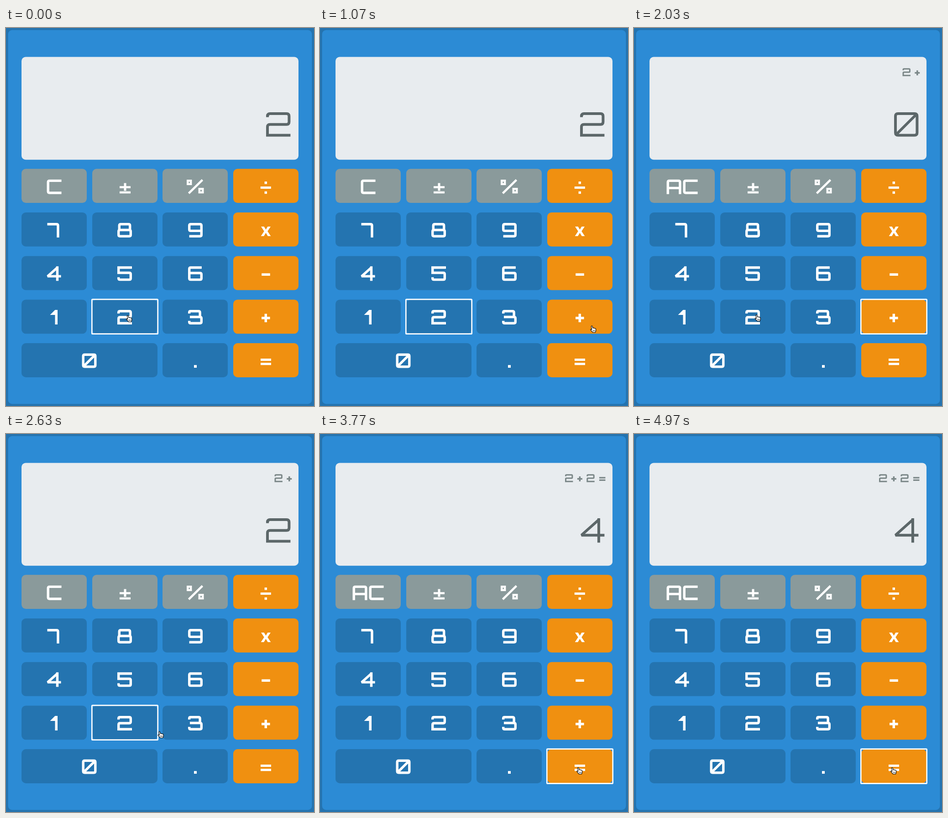
An HTML page that plays this animation: 675 by 830 pixels, repeating every 5.01 s.

```html
<!DOCTYPE html>
<html lang="en">
<head>
<meta charset="utf-8">
<title>Calculator</title>
<style>
  html, body { margin: 0; width: 100%; height: 100%; overflow: hidden; background: #2473af; }
  svg { display: block; width: 675px; height: 830px; }
  path { vector-effect: non-scaling-stroke; }
</style>
</head>
<body>
<svg id="stage" viewBox="0 0 675 830"></svg>
<script>
// Letter centrelines in a unit square; stroke width is added outside it.
const box = 'M.12 0H.88Q1 0 1 .12V.88Q1 1 .88 1H.12Q0 1 0 .88V.12Q0 0 .12 0Z';
const glyphs = {
  0: box + 'M.05 .95L.95 .05',
  2: 'M0 .1Q0 0 .12 0H.88Q1 0 1 .12V.38Q1 .5 .88 .5H.12Q0 .5 0 .62V1H1',
  3: 'M0 .1Q0 0 .1 0H.76Q.88 0 .88 .12V.48M.15 .48H.88Q1 .48 1 .6V.88Q1 1 .88 1H.12Q0 1 0 .9',
  4: 'M.8 1V0M.75 .05L0 .72H1',
  5: 'M1 0H0V.43H.88Q1 .43 1 .55V.88Q1 1 .88 1H.12Q0 1 0 .9',
  6: 'M.92 0H.12Q0 0 0 .12V.88Q0 1 .12 1H.88Q1 1 1 .88V.57Q1 .45 .88 .45H0',
  7: 'M0 0H.66Q.78 0 .78 .12V1',
  8: 'M.06 .48V.12Q.06 0 .18 0H.82Q.94 0 .94 .12V.48M.12 .48H.88Q1 .48 1 .6V.88Q1 1 .88 1H.12Q0 1 0 .88V.6Q0 .48 .12 .48Z',
  9: 'M1 .55H.12Q0 .55 0 .43V.12Q0 0 .12 0H.88Q1 0 1 .12V.88Q1 1 .88 1H.1',
  A: 'M0 1V.12Q0 0 .12 0H.88Q1 0 1 .12V1M0 .6H1',
  C: 'M1 0H.12Q0 0 0 .12V.88Q0 1 .12 1H1'
};
const white = '#fff', dark = '#5c6769', soft = '#7b8788';
const stage = document.getElementById('stage');

const rect = (x, y, w, h, fill, r = 0, extra = '') =>
  `<rect x="${x}" y="${y}" width="${w}" height="${h}" rx="${r}" fill="${fill}" ${extra}/>`;

// x, y, size describe the outer box of the letter
function glyph(ch, x, y, size = 32, weight = 5.4, color = white) {
  const k = size - weight, o = weight / 2;
  return `<path d="${glyphs[ch]}" transform="translate(${x + o} ${y + o}) scale(${k})" fill="none"
    stroke="${color}" stroke-width="${weight}" stroke-linecap="square" stroke-miterlimit="2"/>`;
}
const bar = (cx, cy, w, h, color = white) => rect(cx - w / 2, cy - h / 2, w, h, color);
const plus = (cx, cy, size, weight, color) =>
  bar(cx, cy, size, weight, color) + bar(cx, cy, weight, size, color);
const small = (ch, x) => glyph(ch, x, 88.3, 17.4, 3, soft);
const line = (d, w) => `<path d="${d}" fill="none" stroke="#fff" stroke-width="${w}"/>`;

const colX = c => [34, 189, 343, 498][c];
const rowY = r => 309.3 + r * 95.7;
const key = (c, r, color, w = 143) => rect(colX(c), rowY(r), w, 74.8, color, 9.5);

function keys() {
  let s = '';
  for (let r = 0; r < 5; r++)
    for (let c = 0; c < 4; c++) {
      if (r === 4 && c === 1) continue;
      const color = c === 3 ? '#f09010' : r ? '#2474b0' : '#8a9a9b';
      s += key(c, r, color, r === 4 && c === 0 ? 298 : 143);
    }
  return s;
}

function labels() {
  const digits = [[7, 90.5, 428], [8, 244, 428], [9, 399, 428], [4, 88.5, 523.3], [5, 244, 523.3],
    [6, 399, 523.3], [2, 244, 619], [3, 399, 619], [0, 166.5, 714.5]];
  return digits.map(d => glyph(...d)).join('') +
    '<path d="M96.5 630L107.5 619H113V651H107.5V630Z" fill="#fff"/>' +
    bar(261, 349.5, 24, 4.6) + bar(261, 349, 5, 17) + bar(261, 361, 24, 4.6) +
    line('M398.2 335.2H405.2V342.8H398.2ZM423.8 353.2H431.3V361H423.8Z', 4.4) +
    line('M400.5 363L430.5 333.5', 4.6) +
    bar(569.3, 350.5, 23, 5) + bar(569.3, 339.8, 5.4, 5.4) + bar(569.3, 361.4, 5.4, 5.4) +
    `<text x="569.5" y="457" text-anchor="middle" fill="#fff"
      font-family="'Open Sans', sans-serif" font-weight="700" font-size="38">x</text>` +
    bar(569.5, 541.3, 18.5, 5.4) + plus(569.3, 636.8, 18.5, 5.4, white) +
    bar(569.5, 728.4, 23, 5) + bar(569.5, 737.6, 23, 5) + bar(415, 743, 6, 6);
}

const hand = `<g id="hand" fill="#fff" stroke="#000" stroke-width="1.1" stroke-linejoin="round">
  <path d="M2.4 1.8Q3.6 .2 4.9 1.6L6 6Q7.4 4.9 8.4 6.3Q9.6 5.5 10.4 6.8Q12.5 6.2 12.6 8.6V11.5L11.4 15.3H5.8L1.2 10.2Q.3 8.2 2 8.2L3.8 9.5Z"/>
  <path d="M6.3 10.3V13M8.2 10.3V13M10.1 10.3V13" fill="none" stroke-width=".8"/></g>`;

stage.innerHTML = rect(0, 0, 675, 830, '#2473af') + rect(4.5, 4.5, 666, 821, '#2c8bd5', 9) +
  rect(34, 63.5, 607, 225.7, '#e8ecef', 9) + keys() +
  rect(0, 0, 144.4, 75.8, 'none', 1.5, 'id="ring" stroke="#fff" stroke-width="2.7"') +
  labels() + '<g id="screen"></g>' + hand;

const [ring, screen, pointer] = ['ring', 'screen', 'hand'].map(id => document.getElementById(id));

// Each step: start time, large digit, history, clear label
const steps = [
  [0, 2, '', 'C'],
  [1340, 0, small(2, 588.5) + plus(620.8, 98.5, 11, 3.4, soft), 'AC'],
  [2300, 2, small(2, 588.5) + plus(620.8, 98.5, 11, 3.4, soft), 'C'],
  [3770, 4, small(2, 537) + plus(569.4, 98.5, 11, 3.4, soft) + small(2, 584.3) +
    bar(618.7, 96, 13.5, 3.2, soft) + bar(618.7, 101.3, 13.5, 3.2, soft), 'AC']
];
// Time, column, row of the focused key
const focus = [[0, 1, 3], [1240, 3, 3], [2200, 1, 3], [3670, 3, 4]];
// Start, end, then the pointer's from and to positions
const moves = [
  [430, 1000, 263, 630, 592, 653],
  [1500, 2000, 592, 653, 264.5, 628.5],
  [2470, 2990, 264.5, 628.5, 562, 731.5]
];
const current = (list, t) => list.filter(e => e[0] <= t).pop();
const ease = p => p * p * (3 - 2 * p);
let shown;

function draw(now) {
  const t = now % 5010;
  const step = current(steps, t);
  if (step !== shown) {
    shown = step;
    const [, digit, history, clear] = step;
    screen.innerHTML = history + glyph(digit, 570, 185, 53.4, 6, dark) +
      (clear === 'C' ? glyph('C', 89.5, 332.7) : glyph('A', 71.5, 332.7) + glyph('C', 107.5, 332.7));
  }
  const [, c, r] = current(focus, t);
  ring.setAttribute('x', colX(c) - .7);
  ring.setAttribute('y', rowY(r) - .5);
  const [a, b, x0, y0, x1, y1] = current(moves, t) || moves[0];
  const p = ease(Math.min(1, Math.max(0, (t - a) / (b - a))));
  pointer.setAttribute('transform', `translate(${x0 + (x1 - x0) * p} ${y0 + (y1 - y0) * p})`);
}

const start = performance.now();
function tick() {
  draw(performance.now() - start);
  requestAnimationFrame(tick);
}
tick();
</script>
</body>
</html>
```
